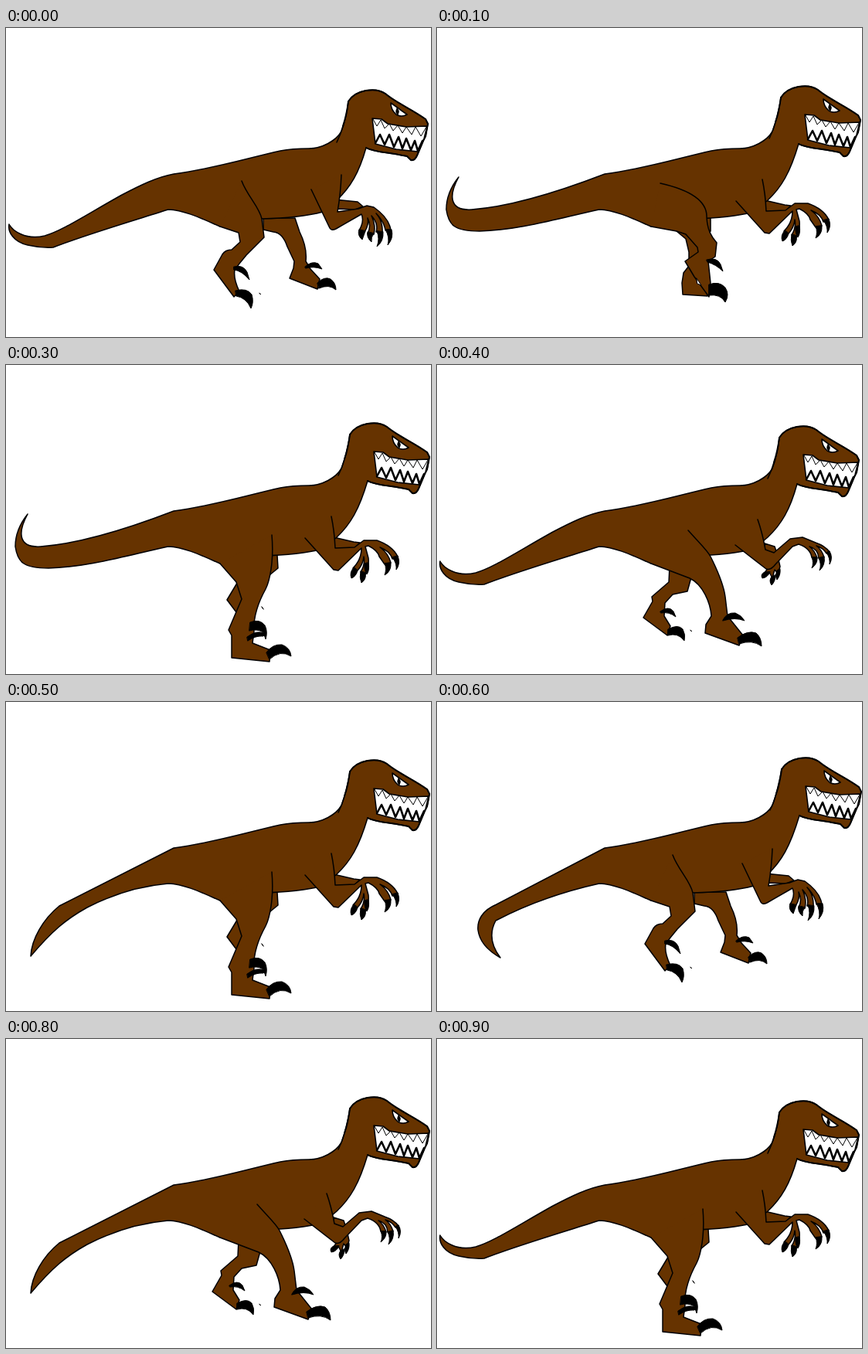
Write an HTML page that moves like this. It is 550 px wide and 400 px high and loops after 1000 ms.

```html
<!DOCTYPE html>
<html lang="en">
<head>
<meta charset="utf-8">
<title>Running raptor</title>
<style>
html, body { margin: 0; width: 100%; height: 100%; overflow: hidden; background: #fff; }
svg { display: block; width: 550px; height: 400px; }
path { fill: #630; stroke: #000; stroke-width: 1.5; stroke-linejoin: round; stroke-linecap: round; }
.black { fill: #000; stroke-width: 1; }
.white { fill: #fff; stroke-width: 1.6; }
.line { fill: none; }
</style>
</head>
<body>
<svg viewBox="0 0 550 400">
  <path id="farLeg"/>
  <path id="farArm"/>
  <path id="body"/>
  <g id="head">
    <path id="skull" class="line" style="stroke-width:2"/>
    <path class="line" d="M436 127Q433 138 428 148"/>
    <path class="white" d="M474 117L486 118L494 124L518 128L545 127L541 143L533 160L505 157L478 150Z"/>
    <path class="line" style="stroke-width:1" d="M475 118L480 127L485 119L490 130L496 124L501 133L507 126L513 136L518 128L525 138L530 128L537 140L544 128"/>
    <path class="line" style="stroke-width:2.6" d="M478 149L484 138L490 151L496 138L502 154L508 141L513 156L518 143L524 158L529 146L533 159L539 146"/>
    <path class="white" d="M498 97L519 112Q512 116 505 112Q498 106 498 97Z"/>
    <path class="black" d="M506 104Q510 107 507 112Q503 109 506 104Z"/>
  </g>
  <path id="nearLeg"/>
  <path id="nearArm"/>
  <path id="claws" class="black"/>
  <path id="gap" class="white" style="stroke-width:1"/>
</svg>
<script>
// Head outline from throat to nape, relative to the throat
const skull = 'c9 5 24 6 37 8l16 3l5 5q5 1 8 -6l8 -19l3 -6l3 -16l-3 -6c-18 -13 -38 -21 -52 -33c-13 -9 -39 -5 -48 10';

// Tails run from the top of the hip to its underside
const tails = {
  mid: 'C195 193 173 204 150 216C105 241 72 263 50 269C25 275 8 262 4 254C2 264 10 277 28 281Q45 285 61 284C105 267 160 251 210 235',
  up: 'C165 209 100 231 45 235C14 237 16 215 28 193C16 208 12 224 12 235C15 255 22 263 55 263C105 262 155 247 210 235',
  high: 'L204 193C150 205 110 212 60 214Q43 214 43 208C45 195 58 186 79 177C45 184 34 193 27 203Q19 220 19 232Q20 240 33 241C90 246 150 238 210 235',
  curl: 'L77 262C58 270 52 283 53 295C55 311 66 322 82 331C69 314 68 298 76 283C120 260 165 245 210 235',
  low: 'L69 264C48 281 33 307 32 329C60 296 78 281 105 266C140 248 175 238 210 235'
};

const arms = {
  back: {
    near: 'M395 209L419 259Q421 263 427 260L460 241Q464 250 457 262L464 264Q470 255 468 246Q473 256 468 266L476 267Q479 256 473 243Q482 253 479 264L487 265Q488 250 479 240Q489 250 491 262L498 262Q496 246 476 232L467 230L456 234L429 238Q433 215 434 190',
    far: 'M425 222L455 225L462 231L452 235L425 234Z',
    claws: 'M457 261Q454 268 461 274L465 263ZM468 264Q466 271 473 277Q472 271 476 266ZM480 263Q484 273 480 283Q489 276 488 264ZM491 261Q497 271 494 281Q502 272 499 261Z'
  },
  mid: {
    near: 'M387 224L424 265L430 266L460 237Q460 252 449 263L454 267Q462 259 463 248Q465 258 459 268L465 271Q470 262 469 250L465 235L469 234Q481 240 483 248L490 258L498 256Q495 244 484 236Q497 241 500 251L507 248Q500 234 480 227L463 227L451 236L426 237Q425 215 421 196',
    far: 'M424 223L450 229L458 230L448 240L422 240Z',
    claws: 'M450 262Q444 269 447 276Q453 274 455 266ZM459 267Q457 275 460 282Q467 277 465 269ZM464 257Q463 265 467 271Q471 265 469 256ZM490 257Q493 264 490 272Q499 267 498 256ZM500 249Q506 257 505 265Q511 257 507 247Z'
  },
  front: {
    near: 'M386 233L426 264Q432 266 438 258L460 235L468 232Q483 237 485 249L492 250Q489 240 482 235Q493 238 494 250L501 249Q498 239 491 234Q500 237 504 244L508 242Q502 234 490 230L473 223L457 225L436 243L425 239Q421 217 415 200',
    far: 'M424 231L437 235L441 247L444 261L441 270L437 265L434 276L430 268L423 270L430 261L424 245Z',
    claws: 'M424 268Q418 271 421 276Q428 275 431 268ZM433 274Q429 279 433 285Q438 280 438 272ZM440 266Q437 273 440 278Q445 272 444 264ZM485 249Q488 256 485 263Q493 257 492 249ZM494 250Q498 258 495 266Q503 259 501 248ZM504 243Q509 250 508 258Q513 249 508 241Z'
  }
};

const dot = 'M328 343.5L329.5 344.5Z';
const legs = {
  back: {
    arm: arms.back,
    near: 'M305 198C312 217 328 232 331 247L334 271L311 294L302 305L296 313Q294 324 302 341L295 348L269 313L280 293Q284 287 292 287L303 277L301 265L277 257',
    far: 'M333 246L374 246L380 264Q390 284 388 302L394 312L406 325L403 338L367 324L372 311L373 302L364 283Q358 265 346 264L333 261Z',
    claws: dot + 'M387 309Q396 301 404 305L409 312Q398 308 388 311ZM403 330Q412 321 420 325Q427 330 427 339Q418 331 405 337ZM295 309Q307 306 312 316L315 326Q305 314 295 313ZM297 340Q312 336 318 345Q321 355 317 363Q311 349 298 347Z'
  },
  pass: {
    arm: arms.mid,
    near: 'M289 201C320 208 350 220 349 245C350 262 355 270 362 278L360 296L351 302L354 330L352 348L333 322L321 302L338 290L337 284L322 267L310 263L277 257',
    far: 'M354 240L354 263L350 270L340 300L350 347L318 345L317 330L319 317L326 308L326 290L322 273L310 263Z',
    claws: 'M349 300Q362 296 367 306L370 315Q361 306 350 303ZM352 332Q365 327 373 336Q379 345 373 355Q367 344 352 346Z',
    gap: 'M336 324L342 333L337 331Z'
  },
  front: {
    arm: arms.front,
    near: 'M325 214C340 231 350 240 354 248C365 270 371 285 373 300L376 325L396 350L391 363L347 347L348 336L355 325C354 308 344 284 327 276L277 257',
    far: 'M301 260L300 281L278 300L279 306L267 327L298 350L302 338L294 325L295 308L305 297L324 293L329 275Z',
    claws: dot + 'M370 330Q375 320 386 321Q394 324 398 331Q386 326 370 331ZM389 353Q402 343 413 347Q420 353 420 364Q408 355 391 361ZM289 319Q300 311 306 319L309 326Q300 319 290 321ZM299 342Q312 335 318 342Q322 349 320 357Q312 346 299 350Z'
  },
  plant: {
    arm: arms.mid,
    near: 'M344 220C347 255 341 280 336 290C325 310 320 330 321 345L319 360L342 369L341 384L292 379L292 350L288 343L305 303L298 281L277 257',
    far: 'M340 243L351 246L352 263L341 272L330 295L316 325L298 320L286 304L301 279Z',
    claws: 'M331 313L333 316ZM337 372Q345 361 357 362Q368 366 369 377Q355 368 341 381ZM316 333Q328 328 335 337Q339 345 336 355L333 346Q325 341 315 344ZM312 352Q325 342 336 348L333 351Q323 350 313 357Z'
  }
};

// One row per 100 ms: legs, tail, head offset
const steps = [
  ['back', 'mid', 0, 0], ['pass', 'up', 2, -5], ['front', 'high', 2, -7], ['plant', 'up', 2, -5],
  ['front', 'mid', 0, -1], ['plant', 'low', 2, -5], ['back', 'curl', 3, -8], ['pass', 'curl', 3, -7],
  ['front', 'low', 2, -5], ['plant', 'mid', 0, 0]
];

const el = id => document.getElementById(id);
const put = (id, d = '') => el(id).setAttribute('d', d);
put('skull', 'M466 155' + skull + 'Q441 112 436 127');

function draw([leg, tail, dx, dy]) {
  const { near, far, claws, gap, arm } = legs[leg];
  put('nearLeg', near);
  put('farLeg', far);
  put('nearArm', arm.near);
  put('farArm', arm.far);
  put('claws', claws + arm.claws);
  put('gap', gap);
  put('body', `M331 247Q380 246 410 238L428 223C446 206 457 187 ${466 + dx} ${155 + dy}${skull}` +
    `Q441 115 434 134C427 146 409 156 392 156Q370 156 355 159C310 169 270 182 217 189${tails[tail]}C232 236 254 247 277 257`);
  el('head').setAttribute('transform', `translate(${dx} ${dy})`);
}

const start = performance.now();
let shown = -1;
function tick() {
  const i = Math.floor((performance.now() - start) / 100) % steps.length;
  if (i !== shown) draw(steps[shown = i]);
  requestAnimationFrame(tick);
}
tick();
</script>
</body>
</html>
```
